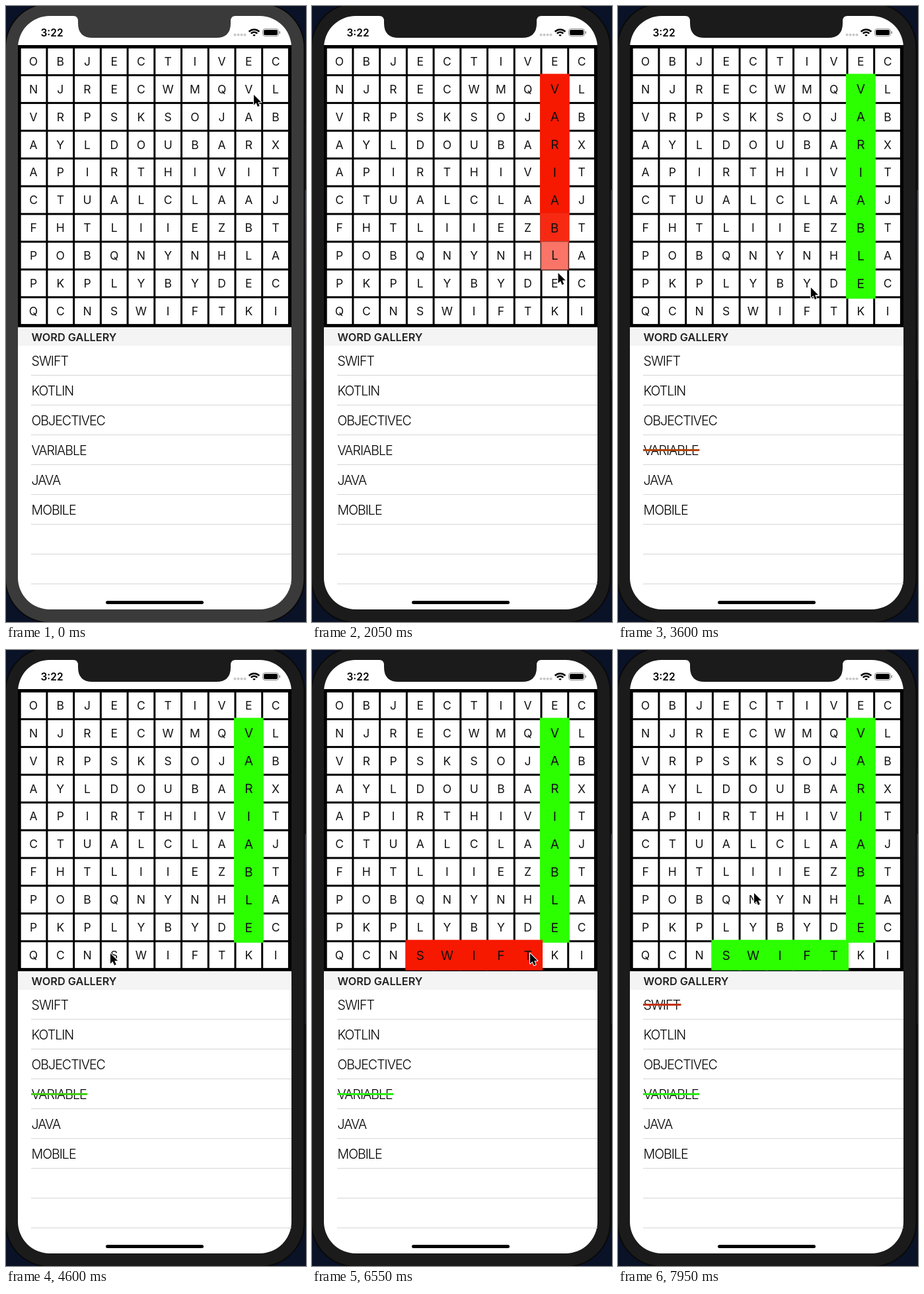
An HTML page with a canvas for the animation above (8 s loop, 454 by 930 pixels).

```html
<!DOCTYPE html>
<html lang="en">
<head>
<meta charset="utf-8">
<title>Word search</title>
<style>
  html, body { margin: 0; width: 100%; height: 100%; overflow: hidden; background: #0a1228; }
  canvas { display: block; width: 454px; height: 930px; }
</style>
</head>
<body>
<canvas id="stage" width="454" height="930"></canvas>
<script>
const ctx = document.getElementById('stage').getContext('2d');
const LOOP = 8000;
const FOCUS_TIME = 500;
const FONT = 'Inter, Roboto, "Liberation Sans", sans-serif';
const CELL_W = 40.72, CELL_H = 41.9, GRID_X = 21.2, GRID_Y = 62.6;
const ROWS = ['OBJECTIVEC', 'NJRECWMQVL', 'VRPSKSOJAB', 'AYLDOUBARX', 'APIRTHIVIT',
              'CTUALCLAAJ', 'FHTLIIEZBT', 'POBQNYNHLA', 'PKPLYBYDEC', 'QCNSWIFTKI'];
const WORDS = ['SWIFT', 'KOTLIN', 'OBJECTIVEC', 'VARIABLE', 'JAVA', 'MOBILE'];
const WHITE = [255, 255, 255], RED = [247, 24, 0], GREEN = [43, 255, 0];

// Each swipe: starting cell, direction, touch time per letter, release time.
const SWIPES = [
  { word: 3, col: 8, row: 1, dx: 0, dy: 1, release: 2600,
    touches: [865, 925, 1130, 1310, 1490, 1650, 1850, 2060] },
  { word: 0, col: 3, row: 9, dx: 1, dy: 0, release: 7100,
    touches: [5146, 5186, 5500, 5700, 5920] }
];

// Pointer tip: time, x, y
const POINTER = [
  [0, 375, 134], [700, 375, 138], [865, 375, 146], [1050, 374, 169], [2050, 372.5, 403],
  [2350, 372, 424], [2650, 372, 424], [3600, 292, 425], [4600, 158, 458], [5120, 158, 458],
  [5250, 205, 458], [5450, 219, 458], [6050, 330, 458], [7050, 330, 458], [7750, 206, 367],
  [8000, 206, 367]
];

const clamp = v => Math.max(0, Math.min(1, v));
const progress = (t, start, duration) => clamp((t - start) / duration);
const mix = (a, b, p) => a.map((v, i) => v + (b[i] - v) * p);
const rgb = c => `rgb(${c.map(Math.round).join(',')})`;

function rect(x, y, w, h, color) {
  ctx.fillStyle = color;
  ctx.fillRect(x, y, w, h);
}

function roundRect(x, y, w, h, r, color) {
  ctx.beginPath();
  ctx.roundRect(x, y, w, h, r);
  ctx.fillStyle = color;
  ctx.fill();
}

function text(str, x, y, size, weight = 400, color = '#111', align = 'left', spacing = 0) {
  ctx.font = `${weight} ${size}px ${FONT}`;
  ctx.textAlign = align;
  ctx.letterSpacing = spacing + 'px';
  ctx.fillStyle = color;
  ctx.fillText(str, x, y);
}

function drawPhone(t) {
  const bezel = t < FOCUS_TIME ? '#3a3a3a' : '#1b1b1b';
  rect(0, 0, 454, 930, '#0a1228');
  rect(450, 178, 4, 100, '#15171c');
  const glow = ctx.createLinearGradient(0, 278, 0, 564);
  glow.addColorStop(0, '#2c4266');
  glow.addColorStop(1, '#17233f');
  rect(450, 278, 4, 286, glow);
  roundRect(-2, -5, 454.5, 937, 68, '#090909');
  roundRect(0, -3, 450.5, 933, 66, bezel);
  roundRect(18, 15, 414, 896, 48, '#fff');

  ctx.fillStyle = bezel;
  ctx.fill(new Path2D('M102 14V15Q109 15 109 23V26Q109 48 131 48H318Q340 48 340 26V23Q340 15 347 15V14Z'));
}

function drawStatus() {
  text('3:22', 52.5, 45.5, 15.5, 600, '#000');
  for (let i = 0; i < 4; i++) roundRect(344.5 + i * 5, 41.5, 4, 4, 2, '#c8c8c8');

  ctx.save();
  ctx.beginPath();
  ctx.moveTo(375.5, 46);
  ctx.arc(375.5, 46, 14, -Math.PI * 0.76, -Math.PI * 0.24);
  ctx.clip();
  ctx.strokeStyle = '#000';
  ctx.lineWidth = 2.5;
  for (const r of [1.8, 6.4, 10.6]) {
    ctx.beginPath();
    ctx.arc(375.5, 46, r, Math.PI, 0);
    ctx.stroke();
  }
  ctx.restore();

  ctx.beginPath();
  ctx.roundRect(388.5, 34.5, 24, 11, 3.5);
  ctx.strokeStyle = '#8c8c8c';
  ctx.lineWidth = 1;
  ctx.stroke();
  roundRect(390, 36, 21, 8, 2, '#000');
  roundRect(413.5, 38, 1.5, 4, 1, '#8c8c8c');
}

const centre = (col, row) => [GRID_X + (col + 0.5) * CELL_W, GRID_Y + (row + 0.5) * CELL_H];

function drawLetter(col, row, scale = 1) {
  const [x, y] = centre(col, row);
  text(ROWS[row][col], x, y + 6.3 * scale, 17.5 * scale, 400, '#111', 'center');
}

function drawGrid() {
  rect(18, 59, 414, 426, '#000');
  for (let row = 0; row < 10; row++) {
    for (let col = 0; col < 10; col++) {
      rect(GRID_X + col * CELL_W + 1.5, GRID_Y + row * CELL_H + 1.5, CELL_W - 3, CELL_H - 3, '#fff');
      drawLetter(col, row);
    }
  }
}

function drawSwipe(swipe, t) {
  const green = progress(t, swipe.release, 500);
  const active = swipe.touches.map((start, i) => {
    const p = 1 - (1 - progress(t, start, 550)) ** 2;
    return { p, scale: 1 + 0.1 * p * p, col: swipe.col + i * swipe.dx, row: swipe.row + i * swipe.dy };
  }).filter(cell => cell.p > 0);

  for (const { p, scale, col, row } of active) {
    const [x, y] = centre(col, row);
    const w = CELL_W * scale, h = CELL_H * scale;
    rect(x - w / 2, y - h / 2, w, h, rgb(mix(mix(WHITE, RED, p), GREEN, green)));
    ctx.strokeStyle = `rgba(0,0,0,${1 - p})`;
    ctx.lineWidth = 1;
    ctx.strokeRect(x - w / 2 + 0.5, y - h / 2 + 0.5, w - 1, h - 1);
  }
  for (const { scale, col, row } of active) drawLetter(col, row, scale);
}

function drawList(t) {
  rect(18, 485, 414, 28, '#f4f4f4');
  text('WORD GALLERY', 38.5, 505.5, 16.3, 600, '#222');
  for (let i = 0; i < 8; i++) rect(38, 557 + i * 45, 394, 1, '#d6d6d8');
  WORDS.forEach((word, i) => text(word, 38.5, 543 + i * 45, 19.6, 300, '#000', 'left', -1));

  for (const { word, release } of SWIPES) {
    const grown = progress(t, release + 150, 450);
    if (!grown) continue;
    ctx.font = `300 19.6px ${FONT}`;
    ctx.letterSpacing = '-1px';
    const width = (ctx.measureText(WORDS[word]).width + 2) * grown;
    const color = mix([212, 28, 10], [43, 235, 20], progress(t, release + 700, 1500));
    rect(38, 534 + word * 45, width, 3, rgb(color));
  }
  roundRect(151, 898, 148, 5, 2.5, '#000');
}

function drawPointer(t) {
  const next = Math.max(1, POINTER.findIndex(key => key[0] > t));
  const from = POINTER[next - 1], to = POINTER[next];
  const [, x, y] = mix(from, to, (t - from[0]) / (to[0] - from[0]));
  ctx.save();
  ctx.translate(x, y);
  const arrow = new Path2D('M0 0V15.5L3.6 12.2L6 18L8.7 16.8L6.3 11.2H11.2Z');
  ctx.lineJoin = 'round';
  ctx.strokeStyle = '#fff';
  ctx.lineWidth = 2;
  ctx.stroke(arrow);
  ctx.fillStyle = '#000';
  ctx.fill(arrow);
  ctx.restore();
}

function frame() {
  const t = performance.now() % LOOP;
  drawPhone(t);
  drawStatus();
  drawGrid();
  for (const swipe of SWIPES) drawSwipe(swipe, t);
  drawList(t);
  drawPointer(t);
  requestAnimationFrame(frame);
}
frame();
</script>
</body>
</html>
```
